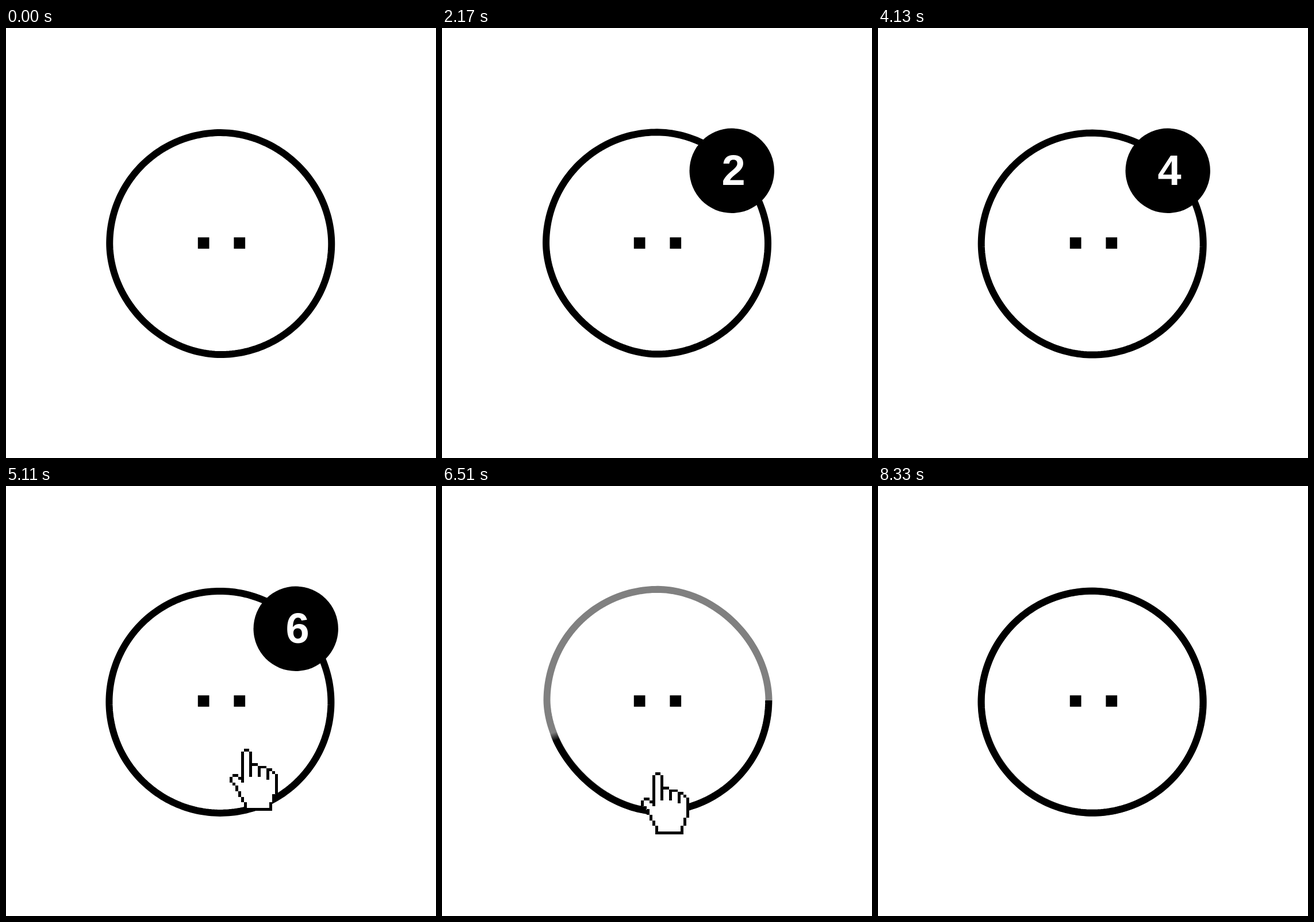
Recreate the animation shown at these times as an HTML page with a canvas. Size 748 by 748 pixels, loop 8.4 s.

```html
<!DOCTYPE html>
<html lang="en">
<head>
<meta charset="utf-8">
<title>Notification face</title>
<style>
  html, body { margin: 0; width: 100%; height: 100%; overflow: hidden; background: #fff; }
  canvas, svg { position: absolute; left: 0; top: 0; width: 748px; height: 748px; }
  text { font: 74px "Liberation Sans", Arial, sans-serif; text-anchor: middle; }
  #count { font-weight: 700; fill: #fff; }
  #count.one { font: 700 72px "Open Sans", sans-serif; }
</style>
</head>
<body>
<canvas id="stage" width="748" height="748"></canvas>
<svg viewBox="0 0 748 748">
  <g id="badge">
    <circle cx="504.2" cy="248.3" r="73.7"/>
    <text id="count" x="507.2" y="273"></text>
  </g>
  <text id="gain" x="501.5">+6</text>
</svg>
<script>
const LOOP = 8400, STEP = 70, COUNT_STEP = 840, CLICK = 5200;
const CELL = 4.92, RADIUS = 193, LINE = 12, TAU = Math.PI * 2;
const $ = id => document.getElementById(id);
const ctx = $('stage').getContext('2d');
const badge = $('badge'), count = $('count'), gain = $('gain');
const clamp = v => Math.max(0, Math.min(1, v));
const easeOut = (p, power) => 1 - (1 - p) ** power;

// Corners of the hand cursor, in grid cells
const outline = ('1,9 2,9 4,11 4,1 5,0 6,0 7,1 7,5 8,5 14,7 16,9 16,15 15,16 ' +
  '15,18 14,19 14,21 5,21 5,19 1,12 0,11 0,10 1,9').split(' ').map(p => p.split(',').map(Number));

// A nearly round ring that sways and is pressed in at two opposite corners
function ring(t, radius, width, style) {
  const wave = peak => Math.cos(TAU * (t - peak) / 1050);
  const shift = 1.9 * wave(360), press = 1 + wave(290);
  ctx.beginPath();
  for (let i = 0; i < 240; i++) {
    const a = i * TAU / 240;
    const corner = Math.max(0, -Math.sin(2 * a)) ** 1.5;
    const depth = press * (Math.sin(a) > 0 ? 3.5 : 2);
    const r = radius * (1 - depth * corner / RADIUS);
    ctx.lineTo(374.3 + shift + r * Math.cos(a), 374 - shift + r * Math.sin(a));
  }
  ctx.closePath();
  ctx.lineWidth = width;
  ctx.strokeStyle = style;
  ctx.stroke();
}

// Black sweep from the right, clockwise, with a soft leading edge
function sweep(p) {
  if (p >= 1) return '#000';
  const g = ctx.createConicGradient(0, 374.3, 373);
  g.addColorStop(0, '#000');
  g.addColorStop(clamp(p - .006), '#000');
  g.addColorStop(clamp(p + .006), 'rgba(0,0,0,0)');
  g.addColorStop(1, 'rgba(0,0,0,0)');
  return g;
}

function cell(x, y) {
  const l = Math.round(x * CELL), t = Math.round(y * CELL);
  ctx.fillRect(l, t, Math.round((x + 1) * CELL) - l, Math.round((y + 1) * CELL) - t);
}

function cellLine([x0, y0], [x1, y1]) {
  const n = Math.max(Math.abs(x1 - x0), Math.abs(y1 - y0));
  for (let i = 0; i <= n; i++) {
    cell(Math.round(x0 + (x1 - x0) * i / n), Math.round(y0 + (y1 - y0) * i / n));
  }
}

function hand(t) {
  const d = t - 5670;
  const drop = d < 0 ? 50 * (-d / 560) ** 2.5 : 91 * (d / 840) ** 2.5;
  if (drop > 345) return;
  const x = 399 + drop * (d < 0 ? 20 / 50 : -23 / 91);
  ctx.save();
  ctx.translate(Math.round(x - 6 * CELL), Math.round(407 + drop));
  ctx.beginPath();
  for (const [cx, cy] of outline) ctx.lineTo((cx + .5) * CELL, (cy + .5) * CELL);
  ctx.fillStyle = '#fff';
  ctx.fill();
  ctx.fillStyle = '#000';
  for (let i = 1; i < outline.length; i++) cellLine(outline[i - 1], outline[i]);
  for (let i = 0; i < 3; i++) cellLine([7 + 3 * i, 5 + i], [7 + 3 * i, 9 + (i >> 1)]);
  ctx.restore();
}

function draw(t) {
  const since = t - CLICK;
  ctx.clearRect(0, 0, 748, 748);

  if (since < 0) {
    ring(t, RADIUS, LINE, '#000');
  } else {
    const e = easeOut(clamp(since / 560), 1.2);
    ring(t + 525, RADIUS + 127 * e, 9, `rgba(0,0,0,${1 - e})`);
    ring(t, RADIUS, LINE, '#808080');
    ring(t - 30, RADIUS, LINE, sweep(easeOut(clamp(since / 3130), 1.09)));
  }

  ctx.fillStyle = '#000';
  for (const x of [333.8, 396.4]) ctx.fillRect(x, 364.2, 19.7, 19.7);
  hand(t);

  const n = Math.floor(t / COUNT_STEP);
  badge.style.opacity = since < 0 && n > 0 ? clamp((t - 770) / 210) : 0;
  count.textContent = n || '';
  count.classList.toggle('one', n === 1);

  const rise = clamp(since / 1000);
  gain.setAttribute('y', 273 - 190 * easeOut(rise, 2));
  gain.style.opacity = since < 0 ? 0 : clamp((1 - rise) / .4);
}

const start = performance.now();
function tick() {
  const t = (performance.now() - start) % LOOP;
  draw(Math.floor(t / STEP) * STEP);
  requestAnimationFrame(tick);
}
tick();
</script>
</body>
</html>
```
